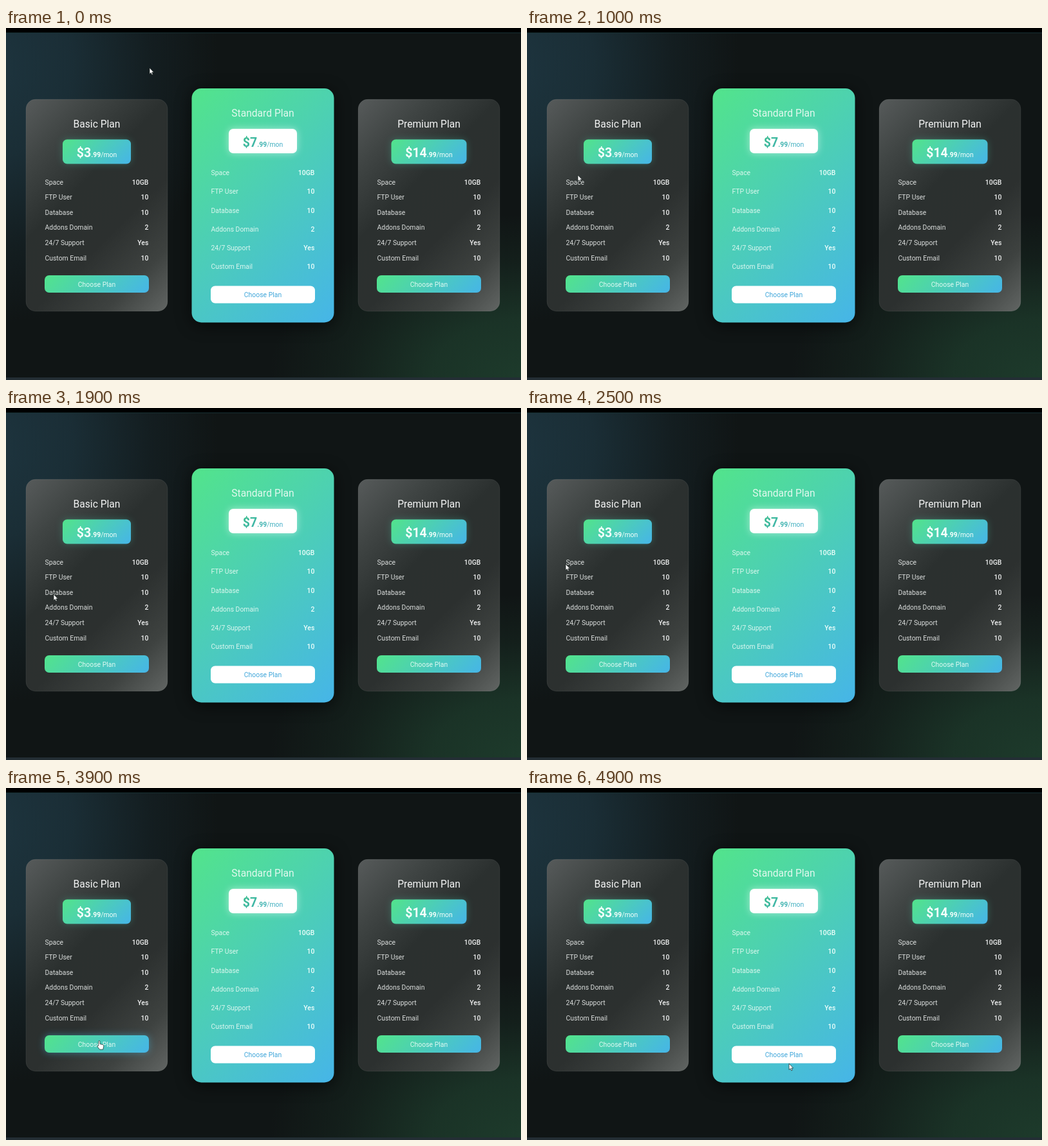
An HTML page that plays this animation: 800x548 px, repeating every 5 s.

```html
<!DOCTYPE html>
<html lang="en">
<head>
<meta charset="utf-8">
<title>Pricing plans</title>
<style>
html, body { margin: 0; width: 100%; height: 100%; overflow: hidden; background: #101515; }
svg { display: block; width: 800px; height: 548px; }
text { font: 10.4px Roboto, sans-serif; }
.title { font-size: 15.6px; }
.val { font-weight: 500; }
.big { font-size: 19.5px; font-weight: 700; }
.cents { font-weight: 700; }
.mid { text-anchor: middle; }
.end { text-anchor: end; }
</style>
</head>
<body>
<svg id="stage" viewBox="0 0 800 548"></svg>
<script>
const stage = document.getElementById('stage');
const rows = [['Space', '10GB'], ['FTP User', '10'], ['Database', '10'],
  ['Addons Domain', '2'], ['24/7 Support', 'Yes'], ['Custom Email', '10']];
const GREEN = '#52e48b', BLUE = '#46b5e8';
let defs = '', count = 0;

// Diagonal gradient with the geometry of CSS 135deg
function diagonal(x, y, w, h, ...stops) {
  const id = 'g' + count++, k = (w + h) / 4, cx = x + w / 2, cy = y + h / 2;
  defs += `<linearGradient id="${id}" gradientUnits="userSpaceOnUse" x1="${cx - k}" y1="${cy - k}" x2="${cx + k}" y2="${cy + k}">` +
    stops.map(([o, c]) => `<stop offset="${o}" stop-color="${c}"/>`).join('') + '</linearGradient>';
  return `url(#${id})`;
}
const fresh = (x, y, w, h) => diagonal(x, y, w, h, [0, GREEN], [1, BLUE]);

function glow(id, cx, cy, rx, ry, color) {
  defs += `<radialGradient id="${id}" gradientUnits="userSpaceOnUse" cx="0" cy="0" r="1" gradientTransform="translate(${cx} ${cy}) scale(${rx} ${ry})">` +
    [[0, 1], [.35, .8], [.7, .28], [1, 0]].map(([o, a]) =>
      `<stop offset="${o}" stop-color="${color}" stop-opacity="${a}"/>`).join('') + '</radialGradient>';
  return rect(0, 0, 800, 548, 0, `url(#${id})`);
}
function rect(x, y, w, h, r, fill, more = '') {
  return `<rect x="${x}" y="${y}" width="${w}" height="${h}" rx="${r}" fill="${fill}" ${more}/>`;
}
function text(x, y, s, fill, cls = '') {
  return `<text x="${x}" y="${y}" fill="${fill}" class="${cls}">${s}</text>`;
}

function card(x, name, dollars, pillW, bright) {
  const y = bright ? 94 : 110.5, h = bright ? 364.5 : 331, w = 221, mid = x + w / 2;
  const step = bright ? 29.25 : 23.6, first = bright ? 229.2 : 243.5;
  const px = mid - pillW / 2, py = y + 63, by = bright ? 401.5 : 385;
  const ink = bright ? '#dcf7ef' : '#dadddc';
  let out = bright
    ? rect(x, y + 4, w, h, 15, '#000', 'opacity=".6" filter="url(#wide)"') + rect(x, y, w, h, 15, fresh(x, y, w, h))
    : rect(x + .5, y + .5, w - 1, h - 1, 15,
        diagonal(x, y, w, h, [0, '#575b5b'], [.2, '#3f4443'], [.4, '#2b302f'], [.62, '#2c302f'], [.82, '#3e4240'], [1, '#626664']),
        'stroke="#fff" stroke-opacity=".07"');
  out += text(mid, y + 44.3, name, bright ? '#e2f8ee' : '#f4f5f5', 'title mid');
  out += rect(px, py, pillW, 38, 7, bright ? '#fff' : '#4cd0b0', `opacity="${bright ? .5 : .28}" filter="url(#soft)"`);
  out += rect(px, py, pillW, 38, 7, bright ? '#fff' : fresh(px, py, pillW, 38));
  const ink2 = bright ? diagonal(px + 20, py, 66, 38, [0, '#3cc184'], [1, '#46a9d8']) : '#f4fffb';
  out += text(mid, py + 27.5, `<tspan class="big">$${dollars}</tspan><tspan class="cents">.99</tspan>/mon`, ink2, 'mid');
  rows.forEach(([label, value], i) => {
    out += text(x + 30, first + i * step, label, ink) +
      text(x + 190.8, first + i * step, value, bright ? '#f0fffb' : '#f0f1f1', 'val end');
  });
  if (name[0] == 'B') out += rect(x + 29.5, by, 162, 27, 7, '#46b5d8', 'id="hover" opacity="0" filter="url(#soft)"');
  out += rect(x + 29.5, by, 162, 27, 7, bright ? '#fff' : fresh(x + 29.5, by, 162, 27));
  return out + text(mid, by + 17.5, 'Choose Plan', bright ? '#3fa6da' : '#e0faf2', 'mid');
}

const scene =
  rect(0, 0, 800, 548, 0, '#101515') +
  glow('teal', -20, 60, 350, 400, '#1d343e') +
  glow('leaf', 800, 540, 390, 250, '#1d3a2b') +
  rect(0, 0, 800, 7, 0, '#000') + rect(0, 7, 800, 1, 0, '#173033') +
  rect(0, 544, 800, 4, 0, '#232e34') +
  card(30.5, 'Basic Plan', 3, 106, false) +
  card(288.5, 'Standard Plan', 7, 106, true) +
  card(546.5, 'Premium Plan', 14, 117, false);

const blur = (id, d) => `<filter id="${id}" x="-50%" y="-100%" width="200%" height="300%"><feGaussianBlur stdDeviation="${d}"/></filter>`;
stage.innerHTML = `<defs>${defs}${blur('soft', 6)}${blur('wide', 13)}</defs>${scene}
  <g id="marks"></g>
  <rect id="popup" x="132" y="348" width="17.5" height="18" rx="1" fill="#3fa982"/>
  <g id="pointer" fill="#fff" stroke="#17201f" stroke-width=".7" stroke-linejoin="round">
    <path id="arrow" d="M0 0V9.6L2.1 7.7L3.7 11L5.2 10.3L3.7 7.1H6.6Z"/>
    <path id="hand" d="M-1 1a1.1 1.1 0 0 1 2.2 0V5L5.2 5.8Q7.2 6.3 7 8.2L6 13.5H.8L-2.7 9.2Q-3.2 7.2-1 7.7Z"/>
  </g>`;

const get = id => document.getElementById(id);
const show = (id, on) => get(id).setAttribute('visibility', on ? 'visible' : 'hidden');

// Selection bars sit between the card and its text
const marks = get('marks');
const firstLabel = [...stage.querySelectorAll('text')].find(t => t.textContent == 'Space');
firstLabel.before(marks);
const ends = [91, 105, 107, 136, 123], starts = [195, 209, 209, 214];

function select(x, y) {
  const last = Math.min(4, Math.max(0, Math.floor((y - 228) / 23.6)));
  let out = '';
  for (let i = 0; i <= last; i++) {
    const top = 233.3 + i * 23.6, right = i < last ? ends[i] : Math.min(x, ends[i]);
    out += rect(60.5, top, Math.max(0, right - 60.5), 13, 0, '#2c5fcb');
    if (i < last) out += rect(starts[i], top, 223 - starts[i], 13, 0, '#2c5fcb');
  }
  marks.innerHTML = out;
}

// Pointer stops: time, x, y
const path = [[0, 223, 62], [300, 205, 74], [600, 165, 100], [1000, 79, 229], [1200, 108, 268],
  [1500, 150, 305], [1800, 105, 308], [1900, 74, 290], [2500, 60, 243], [2600, 61, 243],
  [3000, 105, 335], [3100, 108, 336], [3300, 138, 358], [3600, 138, 359], [4000, 146, 400],
  [4300, 149, 409], [4500, 205, 411], [4900, 407, 429]];

function pointerAt(t) {
  const i = Math.max(1, path.findIndex(p => p[0] >= t));
  const [t0, x0, y0] = path[i - 1], [t1, x1, y1] = path[i];
  const u = (t - t0) / (t1 - t0), e = u * u * (3 - 2 * u);
  return [x0 + (x1 - x0) * e, y0 + (y1 - y0) * e];
}

function draw(now) {
  const t = Math.floor(now % 5000 / 100) * 100;
  const [x, y] = pointerAt(t);
  const popup = t >= 3200 && t < 3700;
  const onButton = (x > 60 && x < 222 && y > 385 && y < 412) || (x > 318 && x < 480 && y > 402 && y < 428.5);
  const hand = onButton || (popup && y > 348 && y < 366);
  if (t >= 2600 && t < 3700) select(...(t < 3100 ? [x, y] : [108, 336]));
  else marks.innerHTML = '';
  show('popup', popup);
  show('arrow', !hand);
  show('hand', hand);
  get('hover').setAttribute('opacity', x < 222 && onButton ? .5 : 0);
  get('pointer').setAttribute('transform', `translate(${x} ${y})`);
  requestAnimationFrame(draw);
}
requestAnimationFrame(draw);
</script>
</body>
</html>
```
